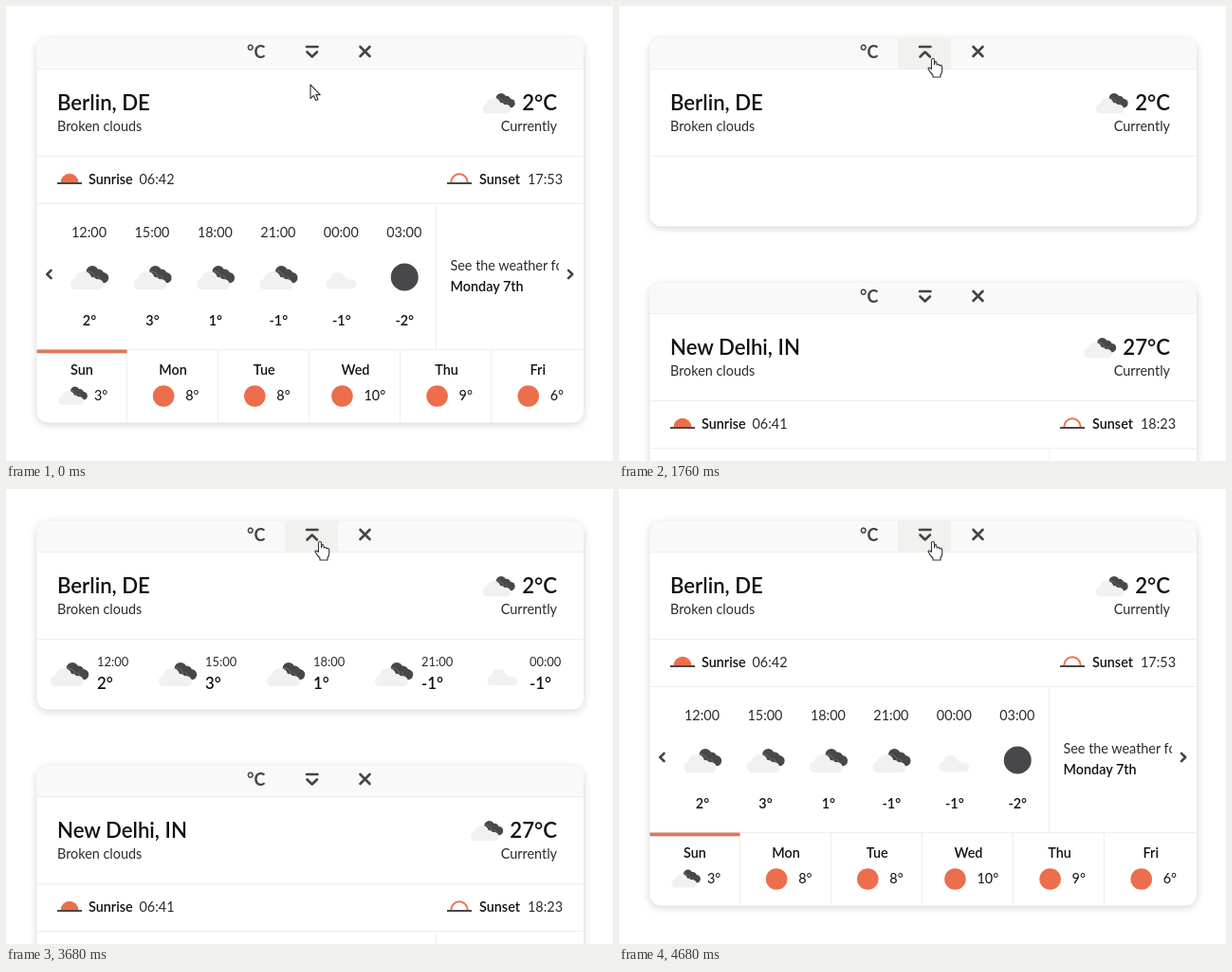
Recreate the animation shown at these times as an HTML page. Size 640 by 480 pixels, loop 5000 ms.

```html
<!DOCTYPE html>
<html lang="en">
<head>
<meta charset="utf-8">
<title>Weather cards</title>
<style>
  html, body { margin: 0; width: 100%; height: 100%; overflow: hidden; background: #fff; }
  svg { display: block; width: 640px; height: 480px; font: 14.4px Lato, "Open Sans", sans-serif; }
  .panel { fill: #fff; filter: drop-shadow(0 2px 4px rgba(0, 0, 0, .17)); }
  .bar { fill: #f9f9f9; }
  .rule { stroke: #efefef; fill: none; }
  .glyph { stroke: #444; stroke-width: 2.6; fill: none; stroke-linecap: round; stroke-linejoin: round; }
  .bold { font-weight: 600; }
  .sun { fill: #ec6e4c; }
  .dark { fill: #48484a; }
  .light { fill: #f1f1ef; }
  .cursor { fill: #fff; stroke: #333; stroke-width: 1.1; stroke-linejoin: round; }
</style>
</head>
<body>
<svg id="stage" viewBox="0 0 640 480"></svg>
<script>
const HOURS = ['12:00', '15:00', '18:00', '21:00', '00:00', '03:00'];
const HOUR_TEMPS = [2, 3, 1, -1, -1, -2];
const DAYS = ['Sun', 'Mon', 'Tue', 'Wed', 'Thu', 'Fri'];
const DAY_TEMPS = [3, 8, 8, 10, 9, 6];

const path = (d, cls) => `<path d="${d}" class="${cls}"/>`;
const circle = (x, y, r, cls) => `<circle cx="${x}" cy="${y}" r="${r}" class="${cls}"/>`;
const place = (x, y, scale, body) => `<g transform="translate(${x} ${y}) scale(${scale})">${body}</g>`;

function text(x, y, str, { size = 14.4, bold = false, anchor = 'start', fill = '#2c2c2c', extra = '' } = {}) {
  return `<text x="${x}" y="${y}" font-size="${size}" text-anchor="${anchor}" fill="${bold ? '#111' : fill}"
    class="${bold ? 'bold' : ''}" ${extra}>${str}</text>`;
}

const puff = 'M-14 12.5A6 6 0 0 1-13 1A8.8 8.8 0 0 1 4-.5Q7-.5 8.5 2.5A5.2 5.2 0 0 1 14 12.5Z';
const lightCloud = (x, y, scale = 1) => place(x, y, scale, path(puff, 'light'));
const clouds = (x, y, scale = 1) => place(x, y, scale,
  circle(3, -6.2, 6.3, 'dark') + circle(9.5, -3.5, 5.6, 'dark') + circle(14.6, .2, 5.6, 'dark') +
  `<path d="M-2-7Q5-6 6 0M8-2Q11-1 11.5 4" fill="none" stroke="#77777a" stroke-width=".8"/>` +
  `<g transform="translate(-2 0)">${path(puff, 'light')}</g>`);

const hourIcon = (i, x, y) =>
  i < 4 ? clouds(x, y) : i === 4 ? lightCloud(x, y + .5, .9) : circle(x, y - .5, 14.5, 'dark');

function horizon(x, filled) {
  const style = filled ? 'class="sun"' : 'fill="none" stroke="#ec6e4c" stroke-width="2"';
  const r = filled ? 9.3 : 8.7;
  return `<path d="M${x - r} 186a${r} ${r} 0 0 1 ${2 * r} 0" ${style}/>` +
    `<path d="M${x - 13} 187h26" stroke="#48484a" stroke-width="2"/>`;
}

const chevron = {
  down: 'M317 43h11.5M317.5 48.5l5.2 5 5.2-5',
  up: 'M317 43h11.5M317.5 53.5l5.2-5 5.2 5',
};

function header({ city, temp, iconX, arrow, hoverId = '' }) {
  return path('M32.5 66V46a12 12 0 0 1 12-12H597a12 12 0 0 1 12 12V66Z', 'bar') +
    (hoverId ? `<rect id="${hoverId}" x="294" y="34" width="56" height="32" fill="#f1f1ee"/>` : '') +
    path('M32.5 66.5H609M32.5 158.5H609', 'rule') +
    `<text x="254" y="55" font-size="18" font-weight="700" fill="#444">°C</text>` +
    path(chevron[arrow], 'glyph') + path('M373.5 43l10 10m0-10l-10 10', 'glyph') +
    text(54, 110, city, { size: 22.2, bold: true }) + text(54, 132, 'Broken clouds') +
    clouds(iconX, 102.5, .85) +
    text(581, 110, temp, { size: 22.2, bold: true, anchor: 'end' }) +
    text(581, 132, 'Currently', { anchor: 'end' });
}

function details(sunrise, sunset) {
  let out = path('M32.5 208.5H609M32.5 362.5H609M453.5 208V362', 'rule') +
    horizon(67, true) + text(87, 188, 'Sunrise', { bold: true }) + text(140.5, 188, sunrise) +
    horizon(478, false) + text(499, 188, 'Sunset', { bold: true }) +
    text(587, 188, sunset, { anchor: 'end' });
  HOURS.forEach((hour, i) => {
    const x = 87.5 + 66.45 * i;
    out += text(x, 244, hour, { anchor: 'middle' }) + hourIcon(i, x + .5, 286.5) +
      text(x + .5, 337, HOUR_TEMPS[i] + '°', { bold: true, anchor: 'middle' });
  });
  out += text(468.5, 279, 'See the weather for', { extra: 'clip-path="url(#note)"' }) +
    text(468.5, 301, 'Monday 7th', { bold: true }) +
    path('M47.5 278.8l-4.2 4.2 4.2 4.2M593 278.8l4.2 4.2-4.2 4.2', 'glyph');
  DAYS.forEach((day, i) => {
    const x = 80 + 96.15 * i;
    const shift = DAY_TEMPS[i] > 9 ? -4 : 0;
    if (i) out += path(`M${Math.floor(x - 48) - .5} 363V439`, 'rule');
    out += text(x, 389, day, { bold: true, anchor: 'middle' }) +
      (i ? circle(x - 10 + shift, 411.5, 11.3, 'sun') : clouds(x - 9.5, 411, .76)) +
      text(x + 13 + shift, 416, DAY_TEMPS[i] + '°', { fill: '#111' });
  });
  return out + '<rect x="32.5" y="362.5" width="95" height="3.8" fill="#e07757"/>';
}

const compact = () => HOURS.slice(0, 5).map((hour, i) => {
  const x = 96 + 114 * i;
  return hourIcon(i, x - 29 + (i === 4 ? .5 : 0), 195.5) + text(x, 187, hour, { size: 12.9 }) +
    text(x, 211, HOUR_TEMPS[i] + '°', { size: 16.8, bold: true });
}).join('');

const panel = height => `<rect x="32.5" y="34" width="576.5" height="${height}" rx="12" class="panel"/>`;
const berlin = { city: 'Berlin, DE', temp: '2°C', iconX: 519.5 };
const delhi = { city: 'New Delhi, IN', temp: '27°C', iconX: 507, arrow: 'down' };

const stage = document.getElementById('stage');
stage.innerHTML = `
  <defs><clipPath id="note"><rect x="460" y="260" width="123" height="30"/></clipPath></defs>
  <g id="openCard">${panel(405.5)}${header({ ...berlin, arrow: 'down', hoverId: 'hover' })}
    <g id="details">${details('06:42', '17:53')}</g></g>
  <g id="closedCards">${panel(198.5)}${header({ ...berlin, arrow: 'up', hoverId: 'hoverClosed' })}
    <g id="compact">${compact()}</g>
    <g transform="translate(0 258)">${panel(405.5)}${header(delhi)}${details('06:41', '18:23')}</g></g>
  <g id="pointer">
    ${path('M0 0V14.6L3.3 11.5 5.6 16.6 8 15.5 5.8 10.6H10.3Z', 'cursor')}
    ${path('M-1.5 1.5Q0-1 1.5 1.5V7Q3-.0 4.3 7.2 5.8 5.4 7 8 8.5 6.4 9.7 9V13Q9.7 16 8 17.5V20H0V18Q-3.8 14-5 11-4.4 8.8-1.5 11.5Z', 'cursor')}
  </g>`;

const el = id => document.getElementById(id);
const [arrowShape, handShape] = el('pointer').children;
const show = (node, on) => node.setAttribute('display', on ? 'inline' : 'none');

function ease(t, start, end) {
  const p = Math.min(1, Math.max(0, (t - start) / (end - start)));
  return p * p * (3 - 2 * p);
}

function draw(t) {
  const move = ease(t, 100, 640);
  const y = 83 - 28 * move;
  const hovering = y < 66;
  const closed = t >= 1640 && t < 4080;

  el('pointer').setAttribute('transform', `translate(${321 + 10 * move} ${y})`);
  show(arrowShape, !hovering);
  show(handShape, hovering);
  show(el('hover'), hovering);
  show(el('openCard'), !closed);
  show(el('closedCards'), closed);
  el('details').setAttribute('opacity', t < 1640 ? 1 : ease(t, 4080, 4570));
  el('compact').setAttribute('opacity', ease(t, 1760, 2240));
}

const startTime = performance.now();
function frame() {
  draw((performance.now() - startTime) % 5000);
  requestAnimationFrame(frame);
}
frame();
</script>
</body>
</html>
```
